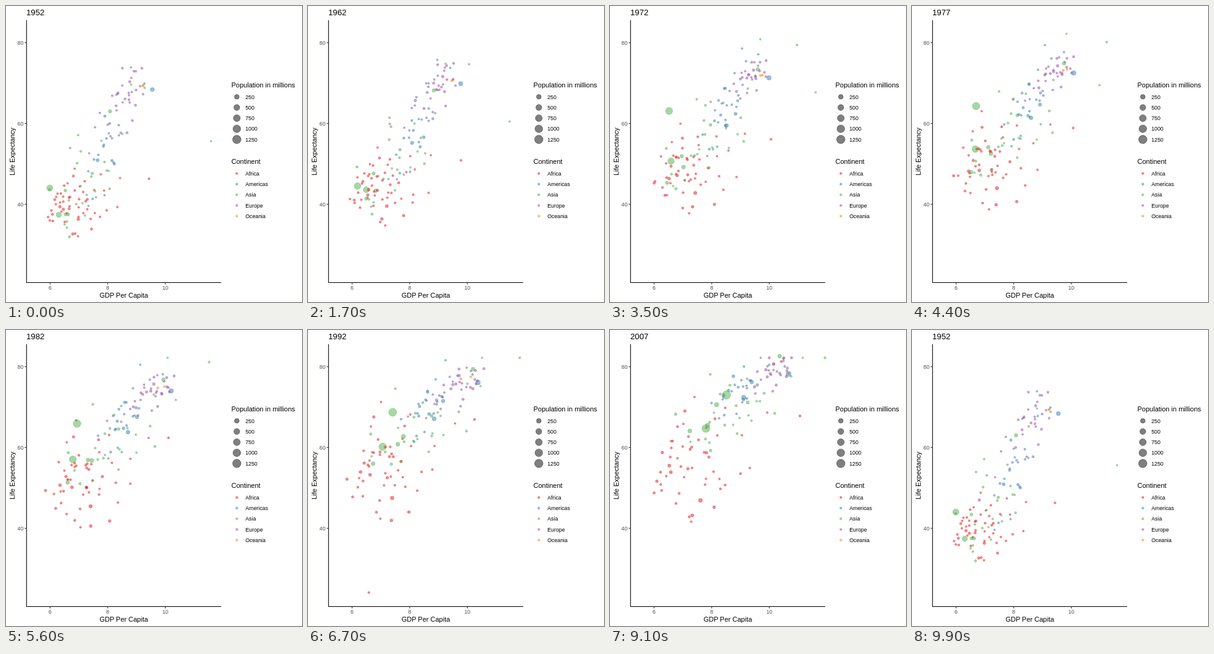
These frames come from a looping animation (480x480 px, 10 s). An HTML page:

```html
<!DOCTYPE html>
<html lang="en">
<head>
<meta charset="utf-8">
<title>Life expectancy and GDP</title>
<style>
  html, body { margin: 0; width: 100%; height: 100%; overflow: hidden; background: #fff; }
  svg { display: block; width: 100vw; height: 100vh; }
  text { font: 8.8px "Liberation Sans", Arial, Helvetica, sans-serif; }
  .title { font-size: 13.2px; }
  .label { font-size: 11px; }
  .tick { fill: #4d4d4d; }
  .mid { text-anchor: middle; }
  .end { text-anchor: end; }
  path { fill: none; stroke: #000; stroke-width: 1.07; }
  path.ticks { stroke: #333; }
  circle { fill: currentColor; fill-opacity: .5; stroke: currentColor; stroke-opacity: .5; stroke-width: .7; }
</style>
</head>
<body>
<svg viewBox="0 0 480 480">
  <text id="year" class="title" x="33" y="15">1952</text>
  <g id="dots"></g>
  <path d="M33.3 23V448.5H349"/>
  <path class="ticks" d="M30.3 59.5h3m-3 131h3m-3 131h3M71.5 448.5v3m93.4-3v3m93.4-3v3"/>
  <text class="label mid" x="191" y="473">GDP Per Capita</text>
  <text class="label mid" transform="translate(13.5 236) rotate(-90)">Life Expectancy</text>
  <text class="label" x="365.5" y="132">Population in millions</text>
  <text class="label" x="365.5" y="256">Continent</text>
  <g id="labels"></g>
</svg>
<script>
const STATES = 12, FRAME = 100, LOOP = 10000;
const ARRIVALS = [8, 17, 26, 35, 44, 51, 59, 67, 75, 83, 91, 99];
const COLORS = { Africa: "#e41a1c", Americas: "#377eb8", Asia: "#4daf4a", Europe: "#984ea3", Oceania: "#ff7f00" };

// Key states: every ten years for long tracks, every twenty for short ones.
const LONG = [0, 2, 4, 6, 8, 10, 11], SHORT = [0, 4, 8, 11];

// Distinctive countries: continent, first and last population, then x, y pairs.
const LANDMARKS = [
  ["Asia", 48, 150, 6.53, 37.5, 6.45, 45.3, 6.73, 56, 7.24, 64.1],
  ["Americas", 56, 190, 7.65, 50.9, 8.52, 59.5, 8.85, 67.1, 9.11, 72.4],
  ["Asia", 556, 1318, 5.99, 44, 6.19, 44.5, 6.52, 63.1, 6.87, 65.5, 7.41, 68.7, 8.04, 72, 8.51, 73],
  ["Asia", 372, 1110, 6.3, 37.4, 6.49, 43.6, 6.59, 50.7, 6.75, 56.6, 7.06, 60.2, 7.47, 62.9, 7.8, 64.7],
  ["Asia", 82, 223, 6.62, 37.5, 7.02, 49.2, 7.78, 62.7, 8.17, 70.6],
  ["Asia", 86, 127, 8.08, 63, 9.6, 73.4, 10.2, 79.4, 10.36, 82.6],
  ["Asia", .2, 2.5, 11.59, 55.6, 11.47, 60.5, 11.61, 67.7, 10.35, 71.3, 10.46, 75.2, 10.47, 76.9, 10.76, 77.6],
  ["Americas", 30, 109, 8.15, 50.8, 8.83, 62.4, 9.16, 71.5, 9.39, 76.2],
  ["Africa", 33, 135, 6.98, 36.3, 7.43, 42.8, 7.39, 47.5, 7.61, 46.9],
  ["Asia", 41, 169, 6.53, 43.4, 6.96, 51.9, 7.59, 60.8, 7.86, 65.5],
  ["Americas", 158, 301, 9.55, 68.4, 9.99, 71.3, 10.37, 76.1, 10.67, 78.2]
];

// Everyone else follows the mean and spread of the continent.
const TRENDS = {
  Africa: { n: 50, skew: .18, rho: .45, mx: [6.92, 7.25, 7.25, 7.45], sx: [.62, .75, .82, .92], my: [39.2, 47.5, 54, 55], sy: [5, 6.2, 8.4, 9.2] },
  Americas: { n: 22, skew: .1, rho: .6, mx: [8.1, 8.5, 8.72, 9], sx: [.48, .45, .5, .55], my: [53, 62, 69.4, 73.4], sy: [8.5, 7, 4.8, 4] },
  Asia: { n: 26, skew: .12, rho: .72, mx: [7.4, 8.05, 8.5, 8.9], sx: [.72, 1, 1.1, 1.1], my: [47.5, 58, 67.2, 71], sy: [8.5, 8.4, 6.6, 6.4] },
  Europe: { n: 30, skew: -.18, rho: .75, mx: [8.5, 9.25, 9.62, 10.03], sx: [.52, .4, .55, .5], my: [65, 70.9, 74.6, 77.8], sy: [5, 2.6, 3, 2.7] },
  Oceania: { n: 2, skew: 0, rho: .9, mx: [9.23, 9.73, 9.95, 10.3], sx: [.03, .06, .2, .2], my: [69.3, 71.9, 76.9, 80.7], sy: [.3, .1, 1, .8] }
};

let seed = 1952;
const random = () => (seed = seed * 16807 % 2147483647) / 2147483647;
const gauss = () => (random() + random() + random() - 1.5) * 2;
const mix = (a, b, p) => a + (b - a) * p;
const states = make => Array.from({ length: STATES }, (_, i) => make(i));

function along(keys, values, i) {
  const k = Math.max(1, keys.findIndex(key => key >= i));
  return mix(values[k - 1], values[k], (i - keys[k - 1]) / (keys[k] - keys[k - 1]));
}

const place = (x, y, pop) => [71.5 + 46.7 * (x - 6), 59.5 + 6.55 * (80 - y), radius(pop)];
const radius = pop => 1.4 + .153 * Math.sqrt(pop);

function landmark([continent, first, last, ...pairs]) {
  const xs = pairs.filter((_, k) => k % 2 === 0), ys = pairs.filter((_, k) => k % 2);
  const keys = xs.length > 4 ? LONG : SHORT;
  return { continent, path: states(i => place(along(keys, xs, i), along(keys, ys, i), mix(first, last, i / 11))) };
}

function member(continent, trend, rank) {
  const p = (rank + .5) / trend.n, z = Math.log(p / (1 - p)) / 1.7;
  const wealth = z + trend.skew * (z * z - 1), health = gauss();
  const phase = random() * 6.28, pop = Math.exp(1.4 + .95 * gauss());
  const at = (values, i) => along(SHORT, values, i);
  return { continent, path: states(i => {
    const zx = wealth + .22 * Math.sin(phase + i * .45);
    const zy = trend.rho * wealth + Math.sqrt(1 - trend.rho ** 2) * health + .1 * Math.cos(phase + i * .6);
    return place(at(trend.mx, i) + at(trend.sx, i) * zx, Math.min(82.2, at(trend.my, i) + at(trend.sy, i) * zy), pop * (1 + i / 10));
  }) };
}

// A country with a sudden fall around 1992.
const fallen = { continent: "Africa", path: states(i => {
  const dip = [20.4, 8.5][Math.abs(i - 8)] || 0;
  return place(6.2 + .06 * i - (i > 7 ? .1 : 0), 40 + .56 * i - (i < 8 ? 0 : dip), 2.5 + .55 * i);
}) };

const crowd = [...LANDMARKS.map(landmark), fallen];
for (const [continent, trend] of Object.entries(TRENDS))
  for (let k = 0; k < trend.n; k++) crowd.push(member(continent, trend, k));
crowd.map(dot => dot.order = random());
crowd.sort((a, b) => a.order - b.order);

function add(parent, tag, attrs, content = "") {
  const node = document.createElementNS("http://www.w3.org/2000/svg", tag);
  for (const name in attrs) node.setAttribute(name, attrs[name]);
  node.textContent = content;
  return document.getElementById(parent).appendChild(node);
}

for (const dot of crowd) dot.node = add("dots", "circle", { color: COLORS[dot.continent] });

[80, 60, 40].forEach((v, k) => add("labels", "text", { class: "tick end", x: 28.3, y: 62.7 + 131 * k }, v));
[6, 8, 10].forEach((v, k) => add("labels", "text", { class: "tick mid", x: 71.5 + 93.4 * k, y: 460 }, v));

function legend(y, color, r, text) {
  add("labels", "circle", { cx: 374.3, cy: y, r, color });
  add("labels", "text", { x: 388.2, y: y + 3.2 }, text);
}
[250, 500, 750, 1000, 1250].forEach((pop, k) => legend(147.3 + 17.28 * k, "#000", radius(pop), pop));
Object.keys(COLORS).forEach((name, k) => legend(271.6 + 17.28 * k, COLORS[name], 1.8, name));

const year = document.getElementById("year");
let shown = -1;

function draw(now) {
  const frame = Math.floor(now % LOOP / FRAME);
  if (frame !== shown) {
    shown = frame;
    const from = ARRIVALS.findIndex(f => f >= frame), to = (from + 1) % STATES;
    const steps = ARRIVALS[from] === 51 ? 3 : 4;
    const p = Math.max(0, 1 - (ARRIVALS[from] - frame) / steps);
    year.textContent = 1952 + 5 * (p < .5 ? from : to);
    for (const { node, path } of crowd)
      ["cx", "cy", "r"].forEach((name, k) => node.setAttribute(name, mix(path[from][k], path[to][k], p).toFixed(2)));
  }
  requestAnimationFrame(draw);
}
draw(performance.now());
</script>
</body>
</html>
```
